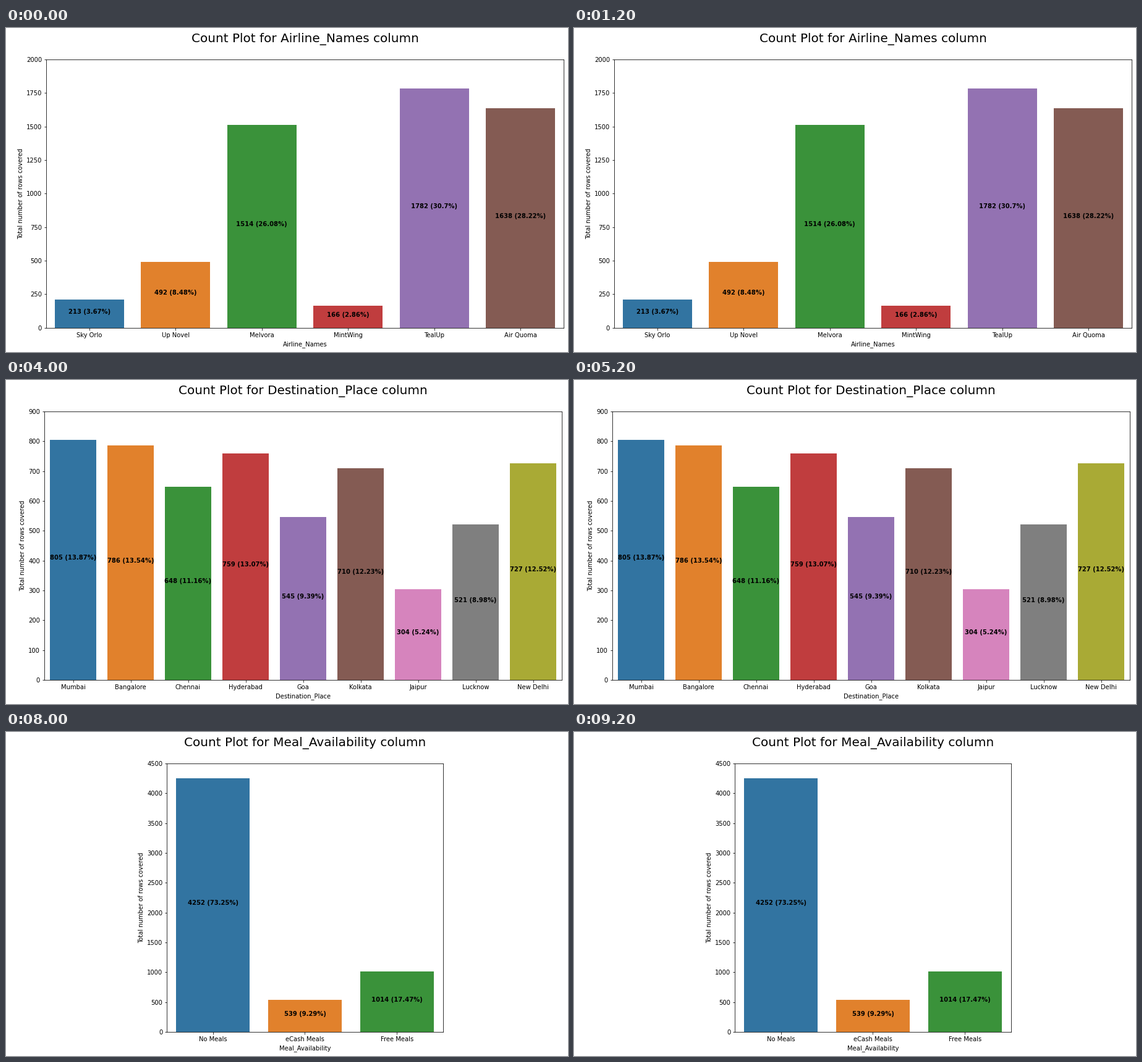
A matplotlib script that plays this animation: 909x525 px, repeating every 10000 ms.

```python
import matplotlib.pyplot as plt
from matplotlib.animation import FuncAnimation

W, H, DPI = 909, 525, 72
TOP, HEIGHT = 50.94, 434.88  # plot area in pixels, measured from the top
COLORS = ["#3274a1", "#e1812c", "#3a923a", "#c03d3e", "#9372b2",
          "#845b53", "#d684bd", "#7f7f7f", "#a9aa35"]

plt.rcParams.update({"font.family": "DejaVu Sans", "font.size": 10})

# column, left, width, y limit, tick step, counts
PLOTS = [
    ("Airline_Names", 65, 837, 2000, 250,
     {"Sky Orlo": 213, "Up Novel": 492, "Melvora": 1514,
      "MintWing": 166, "TealUp": 1782, "Air Quoma": 1638}),
    ("Source_Place", 62, 837, 900, 100,
     {"New Delhi": 748, "Mumbai": 806, "Bangalore": 755,
      "Chennai": 580, "Hyderabad": 614, "Goa": 612,
      "Kolkata": 744, "Jaipur": 427, "Lucknow": 519}),
    ("Destination_Place", 62, 837, 900, 100,
     {"Mumbai": 805, "Bangalore": 786, "Chennai": 648,
      "Hyderabad": 759, "Goa": 545, "Kolkata": 710,
      "Jaipur": 304, "Lucknow": 521, "New Delhi": 727}),
    ("Number_Of_Stops", 65, 837, 4000, 500,
     {"0": 693, "1": 3696, "2": 1154, "3": 244, "4": 18}),
    ("Meal_Availability", 260.3, 446.4, 4500, 500,
     {"No Meals": 4252, "eCash Meals": 539, "Free Meals": 1014}),
]

fig = plt.figure(figsize=(W / DPI, H / DPI), dpi=DPI, facecolor="white")


def draw(i):
    column, left, width, limit, step, counts = PLOTS[i]
    fig.clear()
    ax = fig.add_axes([left / W, 1 - (TOP + HEIGHT) / H,
                       width / W, HEIGHT / H])
    total = sum(counts.values())
    xs = range(len(counts))
    ax.bar(xs, list(counts.values()), width=0.8, color=COLORS[:len(counts)])
    for x, n in zip(xs, counts.values()):
        ax.text(x, n / 2, f"{n} ({round(100 * n / total, 2)}%)",
                ha="center", weight="bold")
    ax.set_xlim(-0.5, len(counts) - 0.5)
    ax.set_ylim(0, limit)
    ax.set_xticks(xs, list(counts))
    ax.set_yticks(range(0, limit + 1, step))
    ax.set_xlabel(column)
    ax.set_ylabel("Total number of rows covered")
    ax.set_title(f"Count Plot for {column} column", fontsize=20, y=1.05)
    return []


anim = FuncAnimation(fig, draw, frames=len(PLOTS), interval=2000,
                     init_func=lambda: draw(0), repeat=True, repeat_delay=0)
plt.show()
```
